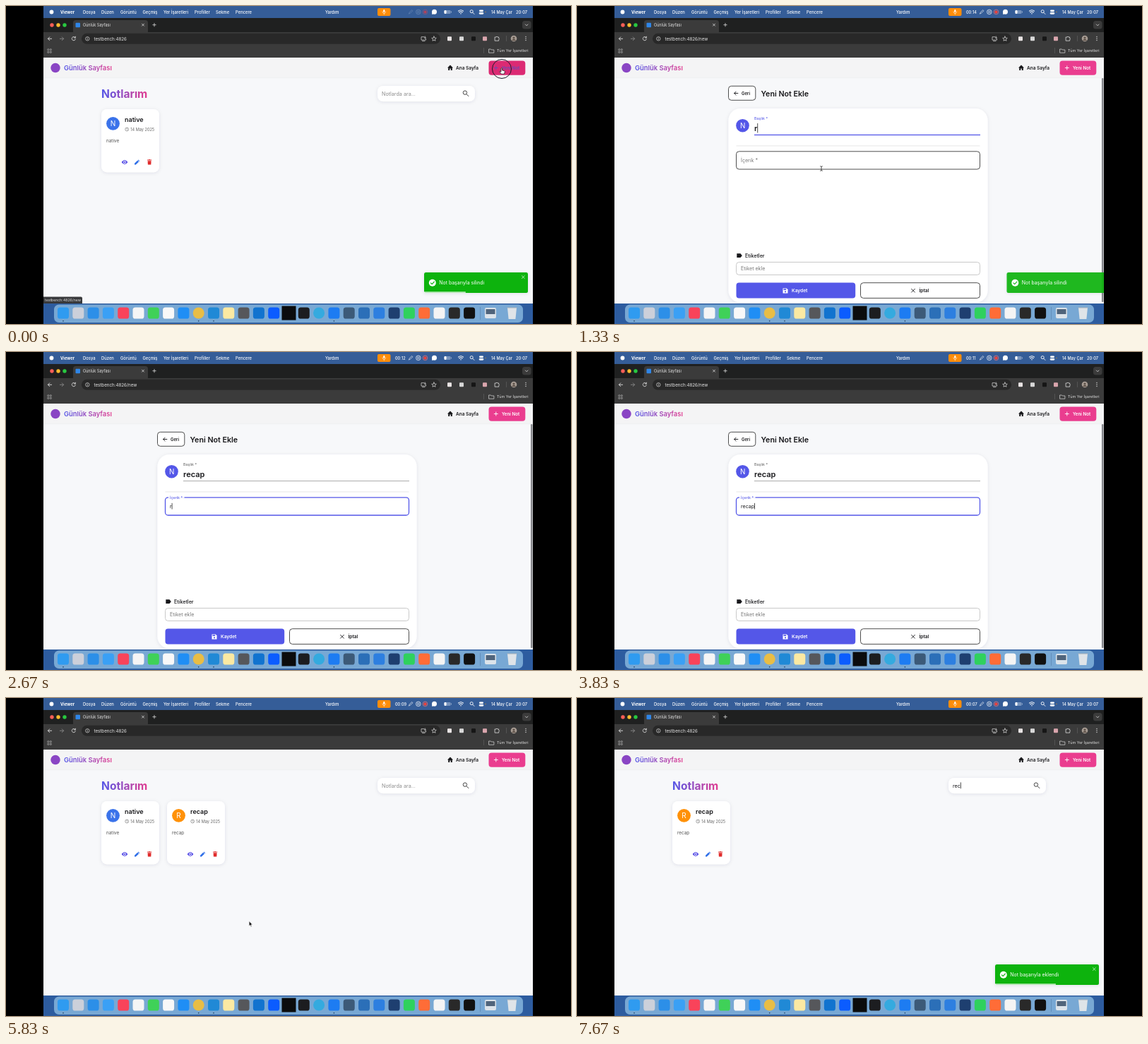
Recreate the animation shown at these times as an HTML page. Size 800 px wide and 450 px high, loop 8000 ms.

```html
<!DOCTYPE html>
<html lang="tr">
<head>
<meta charset="utf-8">
<title>Günlük Sayfası</title>
<style>
html, body { margin: 0; width: 100%; height: 100%; overflow: hidden; background: #000; }
svg { display: block; font-family: Inter, Roboto, sans-serif; }
</style>
</head>
<body>
<svg id="stage" width="800" height="450" viewBox="0 0 800 450">
  <defs>
    <linearGradient id="brand"><stop stop-color="#5558e8"/><stop offset="1" stop-color="#e23c90"/></linearGradient>
    <clipPath id="screen"><path d="M53 0H746V450H53z"/></clipPath>
    <clipPath id="page"><path d="M53 73H746V421H53z"/></clipPath>
    <filter id="soft" x="-20%" y="-20%" width="140%" height="140%">
      <feDropShadow dx="0" dy="1" stdDeviation="2.5" flood-color="#334" flood-opacity=".1"/>
    </filter>
  </defs>
  <g id="desktop" clip-path="url(#screen)"></g>
  <g id="live" clip-path="url(#screen)"></g>
</svg>
<script>
const INDIGO = '#5457e8', PINK = '#ea3d8f', GREEN = '#0ab310', INK = '#18181b';
const APP = 'Günlük Sayfası', HOST = 'testbench:4826', WORD = 'recap';
const $ = id => document.getElementById(id);

// Drawing helpers: each returns SVG markup
const text = (x, y, s, size, fill = INK, weight = 400) =>
  `<text x="${x}" y="${y}" font-size="${size}" fill="${fill}" font-weight="${weight}">${s}</text>`;
const rect = (x, y, w, h, fill, r = 0, more = '') =>
  `<rect x="${x}" y="${y}" width="${w}" height="${h}" rx="${r}" fill="${fill}" ${more}/>`;
const circle = (x, y, r, fill, more = '') => `<circle cx="${x}" cy="${y}" r="${r}" fill="${fill}" ${more}/>`;
const ring = (x, y, r, color, width = .8) => circle(x, y, r, 'none', `stroke="${color}" stroke-width="${width}"`);
const line = (d, color, width = .9) =>
  `<path d="${d}" fill="none" stroke="${color}" stroke-width="${width}" stroke-linecap="round" stroke-linejoin="round"/>`;
const shape = (d, fill, more = '') => `<path d="${d}" fill="${fill}" ${more}/>`;
const frame = (x, y, w, h, color, width = .8, r = 4) =>
  rect(x, y, w, h, '#fff', r, `stroke="${color}" stroke-width="${width}"`);
const panel = (x, y, w, h, r) => rect(x, y, w, h, '#fff', r, 'filter="url(#soft)"');
const cross = (x, y, r, color, width) => line(`M${x - r} ${y - r}l${2 * r} ${2 * r}m0 ${-2 * r}l${-2 * r} ${2 * r}`, color, width);
const plus = (x, y, r, color, width) => line(`M${x - r} ${y}h${2 * r}m${-r} ${-r}v${2 * r}`, color, width);
const arrow = (x, y, dir, color) => line(`M${x + 2.6 * dir} ${y}h${-5.2 * dir}m${2.4 * dir} -2.4l${-2.4 * dir} 2.4l${2.4 * dir} 2.4`, color);
const lens = (x, y, r, color, width) => ring(x - r * .3, y - r * .3, r * .75, color, width) + line(`M${x + r * .3} ${y + r * .3}l${r * .8} ${r * .8}`, color, width);
const clockIcon = (x, y) => ring(x, y, 2.4, '#666', .6) + line(`M${x} ${y - 1.4}v1.5l1 .6`, '#666', .5);
const pencil = (x, y, color) => shape(`M${x - 3.2} ${y + 3.2}v-1.8l4.2-4.2 1.8 1.8-4.2 4.2zM${x + 1.5} ${y - 3.2}l.7-.7 1.8 1.8-.7.7z`, color);

const pen = document.createElement('canvas').getContext('2d');
const caret = (x, y, s, size, weight = 400) => {
  pen.font = `${weight} ${size}px Inter, Roboto, sans-serif`;
  return rect(x + pen.measureText(s).width, y - size, .8, size * 1.22, '#222');
};

function menuBar() {
  const items = [[109, 'Dosya'], [135, 'Düzen'], [162, 'Görüntü'], [193.5, 'Geçmiş'], [223, 'Yer İşaretleri'],
    [267, 'Profiller'], [297, 'Sekme'], [325, 'Pencere'], [452, 'Yardım']];
  return rect(53, 0, 693, 17, '#355d98') + circle(64.5, 8.5, 2.9, '#fff')
    + text(77, 10.6, 'Viewer', 5.85, '#fff', 700)
    + items.map(([x, s]) => text(x, 10.6, s, 5.85, '#fff', 500)).join('')
    + rect(526, 3, 18.5, 11, '#ff8d0a', 2) + rect(534.3, 5, 2, 4, '#fff', 1)
    + line('M533 8c0 3.4 4.6 3.4 4.6 0M535.3 10.6v1.3', '#fff', .6)
    + circle(606.5, 8.3, 3.5, '#fff') + shape('M603 12l.5-3 2 2z', '#fff')
    + rect(620.5, 6, 9, 5, '#7894bd', 1.3) + rect(620.5, 6, 3, 5, '#fff', 1.3) + rect(630, 7.5, .8, 2, '#a9bbd5')
    + line('M640.5 7.2q3.5-3 7 0M641.8 9q2.2-2 4.4 0', '#fff', 1.1) + circle(644, 10.7, .8, '#fff')
    + lens(660, 8.5, 2.7, '#fff', .9)
    + rect(670, 5.5, 6, 2.6, '#fff', 1.3) + frame(670, 9.2, 6, 2.2, '#fff', .6, 1.1) + circle(679, 8.5, .6, '#f90')
    + text(687, 10.6, '14 May Çar', 5.6, '#fff', 500) + text(722, 10.6, '20:07', 5.85, '#fff', 500);
}

function browser() {
  const light = '#ddd';
  const addons = [[628, '#e9e4e4'], [645, '#d8d8d8'], [662, '#161616'], [678, '#d9a5ad']];
  return rect(53, 17, 693, 20, '#1f2020') + rect(53, 37, 693, 36, '#3b3b3b') + rect(95, 20, 106, 20, '#3b3b3b', 4)
    + ['#ff5f57', '#febc2e', '#28c840'].map((c, i) => circle(65 + 9 * i, 27, 2.7, c)).join('')
    + rect(98.5, 23.7, 6.5, 6.5, '#2f86e8', 1) + text(109, 28.9, APP, 5.5, '#e6e6e6')
    + cross(194, 26.7, 1.5, light, .8) + plus(210, 26.7, 2.2, light, .8)
    + rect(731, 21, 12.5, 11.5, '#3b3b3b', 3.5) + line('M735.4 26l1.8 1.8 1.8-1.8', light, .8)
    + arrow(62, 46.3, 1, light) + arrow(79, 46.3, -1, '#888')
    + line('M98 44.6a2.6 2.6 0 1 0 .4 2.3M98.3 43.2v1.8h-1.8', light, .9)
    + rect(107, 38.8, 508, 15, '#282828', 7.5) + ring(115.3, 46.3, 2.7, light, .7) + line('M115.3 46v1.5M115.3 44.8v.1', light, .7)
    + line('M592 43.7h-4v4.4h6.5v-2M589.5 49.6h3.5M593.3 43v2.7m-1.2-1.2l1.2 1.2 1.2-1.2', light, .7)
    + line('M606 43l.9 2.2 2.4.2-1.8 1.6.5 2.3-2-1.2-2 1.2.5-2.3-1.8-1.6 2.4-.2z', light, .7)
    + addons.map(([x, c]) => rect(x - 3, 43.3, 6, 6, c, 1)).join('')
    + line('M692.5 44h1.6q.9-2 1.8 0h1.8v1.8q2 .7 0 1.6v1.8h-5.2z', light, .8)
    + rect(708, 42, .6, 8, '#666') + circle(719, 46, 4.3, '#a79c93') + circle(719, 45, 1.6, '#5d5148')
    + shape('M716 49q3-4.5 6 0z', '#5d5148') + [43.5, 46, 48.5].map(y => circle(736, y, .7, light)).join('')
    + [0, 1, 2, 3].map(i => frame(58.8 + 3.5 * (i % 2), 60.8 + 3.5 * (i >> 1), 2, 2, '#bbb', .6, .3).replace('#fff', 'none')).join('')
    + rect(676, 59, .6, 8, '#666') + line('M684 61h2.4l.9 1h3.6v4.2h-6.9z', light, .7)
    + text(695, 65.3, 'Tüm Yer İşaretleri', 5.4, light);
}

function dock() {
  const colors = ['#2f9bf0', '#ccd0da', '#2c8fe8', '#3aa0f5', '#f9435a', '#f5f5f5', '#3fd158', '#f8f8f8', '#1f8ef5',
    '#e9bd45', '#2089d6', '#fbe9a2', '#56575b', '#1173cf', '#0b5cff', '#0b0c0d', '#1c1d20', '#34aadf', '#1d7cf2', '#3c5a78',
    '#2b6fb8', '#2d7fe0', '#1e3f70', '#2fd15d', '#ff6c37', '#f4f4f4', '#292929', '#111'];
  const round = [9, 17];
  return rect(53, 421, 693, 29, '#2d5c9f') + rect(68, 422.5, 664, 25.5, '#78a8d4', 7)
    + colors.map((c, i) => {
      const x = 81 + 21.3 * i, big = i === 15 ? 10 : 8;
      return round.includes(i) ? circle(x, 434.5, 8, c) : rect(x - big, 434.5 - big, 2 * big, 2 * big, c, big === 8 ? 3.6 : 0);
    }).join('')
    + [0, 9, 10, 18].map(i => circle(81 + 21.3 * i, 445.8, .8, '#16324f')).join('')
    + rect(671, 426, .6, 18, '#557fa9') + rect(678, 427, 16, 15, '#dce3ea', 2) + rect(679.5, 429, 13, 7, '#50647b')
    + shape('M710 427h13l-1.6 16h-9.8z', '#dfe4e8') + line('M710 427h13', '#aab2ba', 1.2);
}

function recorder(k) {
  const left = Math.floor(15.4 - k / 6), on = k > 0, ink = on ? '#fff' : '#6e8cb7';
  return (on ? text(551, 10.6, '00:' + String(left).padStart(2, '0'), 5.6, '#fff', 500) : '')
    + line('M570.5 10.8l1-2.2 3.3-3 1.2 1.2-3.3 3z', ink, .6)
    + ring(583.8, 8.4, 3.3, ink, .7) + line('M582.8 7v2.8M584.8 7v2.8', ink, .8)
    + ring(593.5, 8.4, 3.3, on ? '#ff7770' : '#a05272', .7) + circle(593.5, 8.4, 2, on ? '#ff4238' : '#b5425a');
}

function appBar(pressed) {
  const label = pressed ? '#6a4bb5' : '#fff';
  return rect(53, 73, 693, 348, '#f7f8fa') + rect(53, 73, 693, 29, '#f4f4f5') + rect(53, 101.6, 693, .6, '#e9eaed')
    + circle(70, 87.5, 6.7, '#8a45c4') + text(82, 91, APP, 9.4, 'url(#brand)', 600)
    + shape('M625 87.5l4-3.9 4 3.9h-1.2v3.6h-2v-2.5h-1.6v2.5h-2v-3.6z', INK) + text(637, 89.8, 'Ana Sayfa', 6.5, INK, 600)
    + rect(683.5, 77.5, 51.8, 20.3, pressed ? '#dc2a73' : PINK, 4)
    + plus(693.8, 87.5, 2.5, label, .9) + text(702, 89.8, 'Yeni Not', 6.25, label, 600);
}

const noteCard = (name, color, x) => `<g transform="translate(${x} 0)">`
  + panel(135, 146, 82, 89.3, 8) + circle(151.5, 166.3, 9.4, color)
  + `<g text-anchor="middle">${text(151.5, 169.9, name[0].toUpperCase(), 10, '#fff')}</g>`
  + text(168, 164, name, 9, INK, 600) + clockIcon(171.2, 174.5) + text(176.2, 176.6, '14 May 2025', 5.6, '#666')
  + text(142, 193.2, name, 6.4, '#555')
  + shape('M163.6 221q4.4-6 8.8 0q-4.4 6-8.8 0z', '#4f46e5') + circle(168, 221, 1.9, '#fff') + circle(168, 221, 1.1, '#4f46e5')
  + pencil(185.2, 221.4, '#2f6fe8') + shape('M200.6 219.2h5l-.3 5.3h-4.4zM200 217.6h2l.4-.6h1.4l.4.6h2v1h-6.2z', '#e02b2b')
  + '</g>';

function home(k) {
  const query = WORD.slice(0, Math.max(0, k - 43));
  const notes = [['native', '#3b73ea']];
  if (k > 30) notes.push([WORD, '#ff9108']);
  return text(135, 130, 'Notlarım', 15.6, 'url(#brand)', 700) + panel(526, 113, 138, 22, 8)
    + (query ? text(532, 126.6, query, 7.2) : text(532, 126.6, 'Notlarda ara...', 7.2, '#8a8a8a'))
    + (k >= 42 ? caret(532, 126.6, query, 7.2) : '') + lens(651, 123.7, 3.6, '#444', 1)
    + notes.filter(([name]) => name.includes(query)).map(([name, color], i) => noteCard(name, color, 93 * i)).join('');
}

function field(y, h, label, value, focus, hover, gap) {
  const base = y + h / 2 + 2.5, up = focus || value;
  return frame(225.5, y, 345, h, focus ? INDIGO : hover ? '#222' : '#bcbcbc', focus ? 1.3 : .8)
    + (up ? rect(230, y - 1, gap, 2, '#fff') + text(232, y + 2, label, 5.4, focus ? INDIGO : '#666')
      : text(232, base, label, 7.1, '#777'))
    + text(232, base, value, 7.1) + (focus ? caret(232, base, value, 7.1) : '');
}

function editor(k) {
  const typed = start => WORD.slice(0, Math.max(0, k - start + 1));
  const title = typed(8), tag = typed(26);
  const focus = k < 14 ? 'title' : k < 25 ? 'body' : 'tag', inTitle = focus === 'title';
  return frame(214.5, 113.3, 38.3, 20, '#222') + arrow(225.3, 123.5, 1, INK) + text(233, 125.8, 'Geri', 6, INK, 600)
    + text(260.5, 127.5, 'Yeni Not Ekle', 10.7, INK, 600)
    + panel(214.5, 145, 367, 274.5, 17) + circle(234.5, 169.2, 9.3, INDIGO) + text(230.9, 172.8, 'N', 9.8, '#fff')
    + text(251, 161, 'Başlık *', 5.4, inTitle ? INDIGO : '#666') + text(251, 177, title, 11, INK, 600)
    + (inTitle ? caret(251, 177, title, 11, 600) : '')
    + (inTitle ? rect(251, 181.8, 320, 1.3, INDIGO) : rect(251, 182.3, 320, .7, '#888'))
    + rect(225.5, 197.6, 345, .7, '#dcdcdc')
    + field(205.8, 25.2, 'İçerik *', typed(16), focus === 'body', k > 6 && k < 32, 22.5)
    + shape('M226.3 350.3h5.2l2.3 2.9-2.3 2.9h-5.2z', INK) + text(238, 355.7, 'Etiketler', 7.1, INK, 500)
    + field(362.5, 18, 'Etiket ekle', tag, focus === 'tag', false, 31) + (tag ? plus(557.7, 371.5, 2.8, '#666', .9) : '')
    + rect(225.5, 391.5, 168.7, 22, INDIGO, 4)
    + shape('M291.5 399.5h5.3l1.7 1.7v5.3h-7z', '#fff') + rect(292.5, 400.3, 3.7, 1.7, INDIGO) + circle(295, 404.3, 1.1, INDIGO)
    + text(304, 405.3, 'Kaydet', 6.6, '#fff', 600)
    + frame(401.5, 391.7, 169, 21.7, '#222') + cross(476, 402.7, 2.4, INK, .9) + text(484.5, 405.3, 'İptal', 6.6, INK, 600)
    + rect(743, 102, 2.5, 317, '#85868a', 1.2);
}

function toast(label, shift, elapsed) {
  const bar = 147 * Math.min(1, Math.max(0, 1 - elapsed / 3));
  return `<g transform="translate(${shift} 0)" opacity="${shift > 0 ? .92 : 1}">`
    + rect(592, 377, 147, 29, GREEN, 2.5, 'filter="url(#soft)"') + rect(592, 404.2, bar, 1.8, '#fff', 0, 'opacity=".7"')
    + circle(603.8, 391.8, 5, '#fff') + line('M601.4 391.9l1.8 1.8 3.2-3.6', GREEN, 1.2)
    + text(613.3, 394.4, label, 6.95, '#fff') + cross(732.3, 383.6, 1.9, '#d9f5da', .8) + '</g>';
}

function toasts(k) {
  if (k < 9) return toast('Not başarıyla silindi', k === 8 ? 16.5 : 0, k / 6 + 1.8);
  if (k < 36) return '';
  return toast('Not başarıyla eklendi', [140, 43, -20, 8][k - 36] || 0, k / 6 - 6.42);
}

// Pointer stops: step, x, y
const stops = [[0, 702, 91], [1, 690, 97], [3, 475, 180], [7, 346, 230], [8, 346, 230], [14, 350, 230],
  [31, 350, 230], [33, 310, 403], [34, 310, 403], [37, 414, 152], [42, 600, 124], [47, 600, 124]];

function pointer(k) {
  if ((k > 14 && k < 29) || k > 43) return '';
  const n = stops.findIndex(s => s[0] > k), [k0, x0, y0] = stops[n - 1], [k1, x1, y1] = stops[n];
  const p = (k - k0) / (k1 - k0), x = x0 + (x1 - x0) * p, y = y0 + (y1 - y0) * p;
  const edge = 'stroke="#fff" stroke-width=".6"';
  const hand = k === 0 || k === 33 || k === 34, beam = (k > 2 && k < 32) || k > 40;
  const look = hand ? shape('M-1-3q1-1 1.6 0v3l3 .8q1 .5.6 2l-.8 2.4h-4l-2.5-3q-.3-1.2 1-.7l1.1.8z', '#fff', 'stroke="#111" stroke-width=".7"')
    : beam ? line('M-1.3-3.3q1.3 0 1.3.8v5q0 .8-1.3.8M1.3-3.3q-1.3 0-1.3.8M0 2.5q0 .8 1.3.8', '#222', .8)
    : shape('M-.5-3.5v7l1.6-1.5 1.1 2.3 1.1-.5-1.1-2.3h2.2z', '#111', edge);
  const click = [0, 14, 34, 42].includes(k) ? ring(0, -2, 13.5, '#1d1d2b', 1) : '';
  return `<g transform="translate(${x} ${y})">${click}${look}</g>`;
}

function render(k) {
  const editing = k > 0 && k < 35;
  $('live').innerHTML = recorder(k) + text(124.5, 48.6, HOST + (editing ? '/new' : ''), 6.2, '#e8e8e8')
    + `<g clip-path="url(#page)">${appBar(k === 0)}${editing ? editor(k) : home(k)}${toasts(k)}`
    + (k < 5 ? rect(51, 411.5, 57, 12, '#38393b', 2) + text(55, 418.3, HOST + '/new', 5.2, '#ddd') : '')
    + `</g>${pointer(k)}`;
}

$('desktop').innerHTML = menuBar() + browser() + dock();

let shown = -1;
function tick() {
  const k = Math.min(46, Math.floor((performance.now() % 8000) * .006 + .05));
  if (k !== shown) render(shown = k);
  requestAnimationFrame(tick);
}
tick();
</script>
</body>
</html>
```
